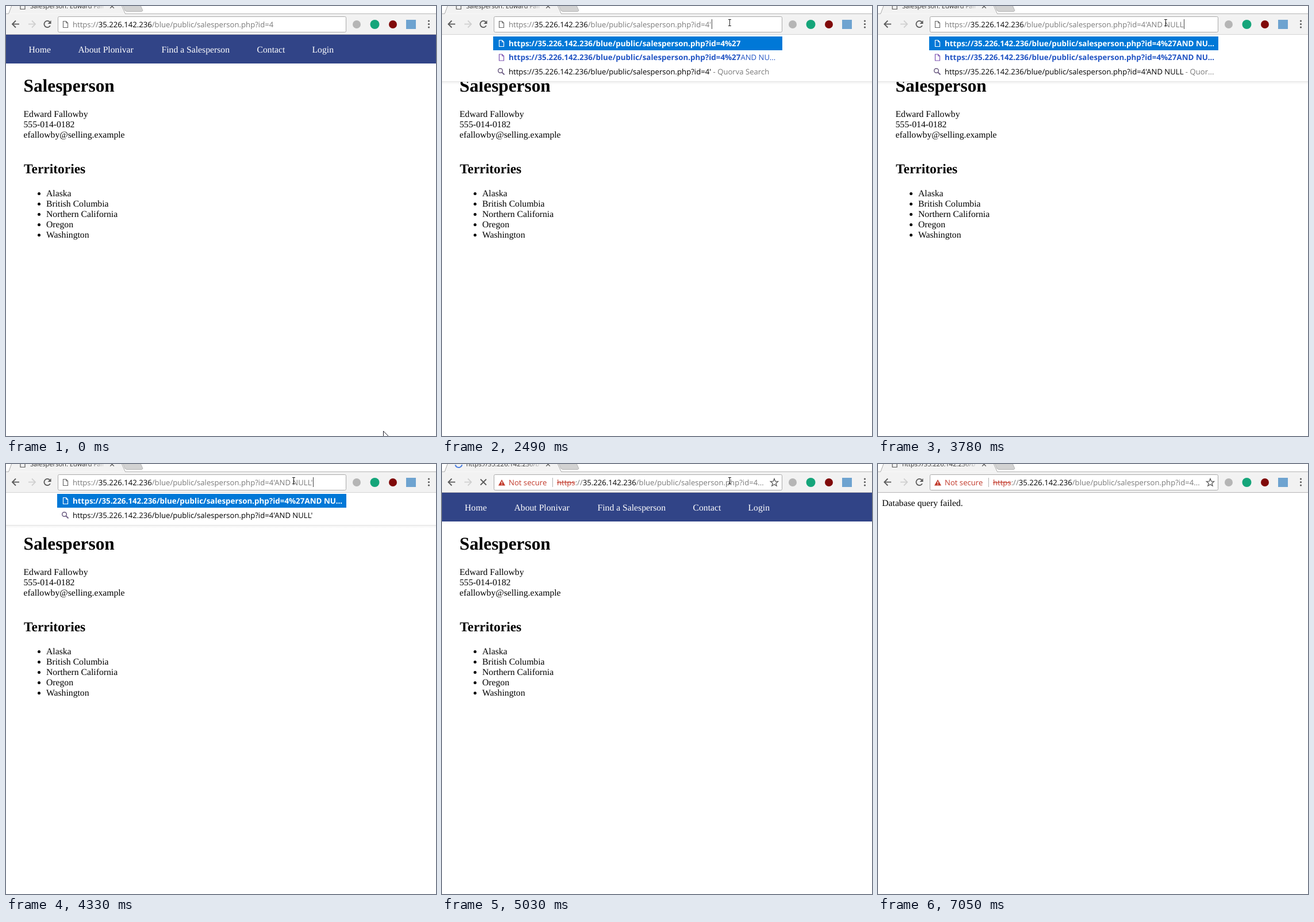
Write an HTML page with a canvas that moves like this. It is 748 px wide and 748 px high and loops after 7.37 s.

```html
<!DOCTYPE html>
<html lang="en">
<head>
<meta charset="utf-8">
<title>Salesperson</title>
<style>
html, body { margin: 0; width: 100%; height: 100%; overflow: hidden; background: #fff; }
canvas { display: block; }
</style>
</head>
<body>
<canvas id="stage" width="748" height="748"></canvas>
<script>
const c = document.getElementById('stage').getContext('2d');
const LOOP = 7370;
const SANS = '"Open Sans", "Noto Sans", sans-serif';
const SERIF = '"Liberation Serif", "Times New Roman", serif';
const UI = `13.13px ${SANS}`, UI_BOLD = `bold 13.4px ${SANS}`, BODY = `15.7px ${SERIF}`;
const BLUE = '#0078d7', LINK = '#2255c4', GRAY = '#7a7a7a', RED = '#c23a2b', ICON = '#5a5a5a';
const HOST = '35.226.142.236', PATH = '/blue/public/salesperson.php?id=4';
const URL_TEXT = 'https://' + HOST + PATH;
const ROW_WIDTH = 469.5;

// typed suffix of the address by time
const typing = [[0, ''], [2490, "'"], [2860, "'A"], [2940, "'AN"], [3090, "'AND"], [3170, "'AND "],
  [3250, "'AND N"], [3480, "'AND NU"], [3630, "'AND NUL"], [3780, "'AND NULL"], [4180, "'AND NULL'"]];

// pointer: time, x, y, shape
const pointer = [[0, 656, 739, 'arrow'], [70, 662, 470, 'arrow'], [140, 611, 61, 'arrow'], [210, 0, 0, ''],
  [440, 508, 26, 'beam'], [520, 504, 27, 'beam'], [680, 501, 28, 'beam'], [830, 500.5, 29, 'beam'],
  [5350, 420, 70, 'arrow'], [5430, 262, 132, 'arrow'], [5510, 138, 157, 'arrow'], [5590, 72, 116, 'arrow'],
  [5660, 58, 81, 'arrow'], [5890, 52, 75, 'arrow'], [5970, 46, 68, 'arrow'], [6045, 56, 61, 'arrow'],
  [6120, 71, 60, 'arrow'], [6195, 84, 65, 'arrow'], [6270, 87, 74, 'arrow'], [6350, 79, 82, 'arrow'],
  [6430, 68, 84, 'arrow'], [6505, 64, 87, 'arrow'], [6580, 67, 90, 'arrow'], [6670, 98, 122, 'arrow'],
  [6750, 228, 262, 'arrow'], [6825, 410, 450, 'arrow'], [6900, 590, 625, 'arrow'], [6975, 717, 737, 'arrow'],
  [7050, 0, 0, '']];

const at = (list, t) => list.findLast(k => k[0] <= t);

function rect(x, y, w, h, color) {
  c.fillStyle = color;
  c.fillRect(x, y, w, h);
}

function text(s, x, y, font, color) {
  c.font = font;
  c.fillStyle = color;
  c.fillText(s, x, y);
  return x + c.measureText(s).width;
}

function width(s, font) {
  c.font = font;
  return c.measureText(s).width;
}

function path(points, color, w = 1, fill, close) {
  c.beginPath();
  points.forEach(([x, y]) => c.lineTo(x, y));
  if (close) c.closePath();
  if (fill) { c.fillStyle = fill; c.fill(); }
  if (color) { c.strokeStyle = color; c.lineWidth = w; c.stroke(); }
}

function disc(x, y, r, color) {
  c.beginPath();
  c.arc(x, y, r, 0, 7);
  c.fillStyle = color;
  c.fill();
}

function arc(x, y, r, from, to, color, w) {
  c.beginPath();
  c.arc(x, y, r, from, to);
  c.strokeStyle = color;
  c.lineWidth = w;
  c.stroke();
}

function page(x, y, color) {
  path([[x, y], [x + 5, y], [x + 8, y + 3], [x + 8, y + 11], [x, y + 11]], color, 1.2, null, true);
  path([[x + 5, y], [x + 5, y + 3], [x + 8, y + 3]], color);
}

function lens(x, y) {
  arc(x, y, 3.8, 0, 7, '#6a5a80', 1.5);
  path([[x + 2.8, y + 2.8], [x + 7, y + 7]], '#6a5a80', 1.8);
}

function arrowIcon(x, dir, color) {
  path([[x - 6 * dir, 31.5], [x + 6 * dir, 31.5]], color, 1.8);
  path([[x, 25.5], [x - 6 * dir, 31.5], [x, 37.5]], color, 1.8);
}

function cross(x, y, r, w) {
  path([[x - r, y - r], [x + r, y + r]], ICON, w);
  path([[x + r, y - r], [x - r, y + r]], ICON, w);
}

function star(x, y) {
  const pts = Array.from({ length: 10 }, (_, i) => {
    const a = i * Math.PI / 5 - Math.PI / 2, r = i % 2 ? 3 : 7;
    return [x + r * Math.cos(a), y + r * Math.sin(a)];
  });
  path(pts, ICON, 1.3, null, true);
}

function drawTab(t) {
  path([[4.5, 13.5], [10, -1], [201, -1], [207.5, 13.5]], '#a8a8a8', 1, '#f2f2f2');
  path([[203, -1], [207, 8], [210, 9.5], [236, 9.5], [238, 8], [234, -1]], '#b4b4b4', 1, '#d2d2d2');
  rect(0, 13, 5, 1, '#b4b4b4');
  rect(207, 13, 541, 1, '#b4b4b4');
  const fade = c.createLinearGradient(145, 0, 175, 0);
  fade.addColorStop(0, '#333');
  fade.addColorStop(1, 'rgba(51,51,51,0)');
  text(t < 4560 ? 'Salesperson: Edward Fall' : URL_TEXT.slice(0, 24), 42, 4, `11.1px ${SANS}`, fade);
  cross(184.5, 0.5, 3.3, 1.3);
  if (t >= 4560 && t < 5110) {
    const a = 0.2 + Math.floor((t - 5030) / 80) * 0.6;
    arc(29, 0, 6, a, a + 2.7, t < 4790 ? '#999' : '#4a7de0', 2);
  } else page(25, -5.5, ICON);
}

function drawToolbar(t) {
  rect(0, 14, 748, 36, '#f2f2f2');
  rect(0, 49, 748, 1, '#b6b4b6');
  arrowIcon(17, 1, ICON);
  arrowIcon(45, -1, '#d0d0d0');
  if (t >= 4560 && t < 5110) cross(72, 31.5, 5, 1.8);
  else {
    arc(72, 31.5, 5.6, 0.5, 5.5, ICON, 1.8);
    path([[78.5, 25], [78.5, 31], [72.5, 31]], null, 1, ICON, true);
  }
  c.beginPath();
  c.roundRect(90.5, 18.5, 501, 27, 2);
  c.fillStyle = '#fff';
  c.fill();
  c.strokeStyle = '#a9a9a9';
  c.lineWidth = 1;
  c.stroke();
  disc(610, 32, 7, '#b5b5b5');
  disc(641.5, 32, 8, '#15a57a');
  disc(673, 32, 7, '#800a0a');
  rect(696, 24, 17, 16, '#6ea3d0');
  for (const y of [26, 31.5, 37]) disc(735.5, y, 1.6, ICON);
}

function drawUrl(x, suffix, color) {
  x = text('https://', x, 37, UI, color || GRAY);
  x = text(HOST, x, 37, UI, color || '#000');
  return text(PATH + suffix, x, 37, UI, color || GRAY);
}

function select(from, to) {
  c.save();
  c.beginPath();
  c.rect(from, 21, to - from, 19);
  c.clip();
  rect(from, 21, to - from, 19, BLUE);
  drawUrl(116, '', '#fff');
  c.restore();
}

function drawAddress(t, suffix) {
  if (t >= 4790) {
    path([[104, 27], [110, 37.5], [98, 37.5]], null, 1, RED, true);
    rect(103.4, 30.5, 1.3, 3.5, '#fff');
    rect(103.4, 35, 1.3, 1.3, '#fff');
    text('Not secure', 116, 37, UI, RED);
    rect(192, 24, 1, 16, '#b0b0b0');
    drawUrl(200, '...');
    const w = width('https', UI);
    rect(200, 22, w, 22, '#fff');
    text('https', 200, 37, UI, RED);
    rect(200, 32, w, 1, RED);
  } else {
    page(99.5, 26.5, '#6a6a6a');
    const end = drawUrl(116, suffix);
    if (t >= 600 && t < 1010) select(116, end);
    if (t >= 1010 && t < 1940) select(end - width('4', UI) - 0.5, end);
    if (t >= 1940 && t < 4560) rect(Math.round(end + 1), 23, 1, 17, '#444');
  }
  if (t >= 4560) star(578, 32.5);
}

// a run of [text, font, color] parts, shortened with dots at the right edge
function row(y, parts) {
  const total = () => parts.reduce((sum, p) => sum + width(p[0], p[1]), 0);
  const last = parts[parts.length - 1], full = last[0];
  for (let n = full.length - 1; n >= 0 && total() > ROW_WIDTH; n--) last[0] = full.slice(0, n).trimEnd() + '...';
  parts.reduce((x, p) => text(p[0], x, y, p[1], p[2]), 116);
}

function drawSuggestions(suffix) {
  const done = suffix.endsWith("NULL'");
  const top = done ? 52 : 53, bottom = done ? 106 : 131;
  const typed = suffix.replaceAll("'", '%27'), rest = 'AND NULL%27'.slice(typed.length - 3);
  const shade = c.createLinearGradient(0, bottom, 0, bottom + 6);
  shade.addColorStop(0, 'rgba(0,0,0,.06)');
  shade.addColorStop(1, 'rgba(0,0,0,0)');
  rect(0, bottom, 748, 6, shade);
  rect(0, 49, 748, 1, '#d4d4d4');
  rect(0, 50, 748, bottom - 50, '#fff');
  rect(0, bottom, 748, 1, '#e2e2e2');
  rect(89, top, 503, 24, BLUE);
  page(99.5, top + 6.5, '#fff');
  row(top + 17, [[URL_TEXT + typed, UI_BOLD, '#fff']]);
  if (!done) {
    page(99.5, 84, '#7a50b0');
    const fits = width(URL_TEXT + typed, UI_BOLD) < 450;
    row(94, fits
      ? [[URL_TEXT + typed, UI_BOLD, LINK], [rest, UI, LINK]]
      : [[URL_TEXT + typed + rest, UI_BOLD, LINK]]);
  }
  const y = done ? 94 : 119, search = [[URL_TEXT + suffix, UI, '#000']];
  lens(101.5, y - 6.5);
  if (!done) search.push([' - Quorva Search', UI, GRAY]);
  row(y, search);
}

function drawPage(t) {
  if (t >= 5110) {
    text('Database query failed.', 7, 73, BODY, '#000');
    return;
  }
  rect(0, 50, 748, 50, '#314487');
  [['Home', 39.5], ['About Plonivar', 125.5], ['Find a Salesperson', 270.5], ['Contact', 436.5], ['Login', 532.5]]
    .forEach(([s, x]) => text(s, x, 81, BODY, '#fff'));
  text('Salesperson', 30.5, 149, `bold 31.3px ${SERIF}`, '#000');
  ['Edward Fallowby', '555-014-0182', 'efallowby@selling.example']
    .forEach((s, i) => text(s, 30.5, 193 + i * 18, BODY, '#000'));
  text('Territories', 31, 291, `bold 23.45px ${SERIF}`, '#000');
  ['Alaska', 'British Columbia', 'Northern California', 'Oregon', 'Washington'].forEach((s, i) => {
    disc(57.5, 326.5 + i * 18, 2.5, '#000');
    text(s, 70, 331 + i * 18, BODY, '#000');
  });
}

function drawPointer(t) {
  const [, x, y, shape] = at(pointer, t);
  if (shape === 'arrow') {
    const outline = [[0, 0], [0, 13], [3, 10.2], [5.3, 15.2], [7.4, 14.2], [5.2, 9.4], [9.3, 9.4]];
    path(outline.map(([dx, dy]) => [x + 0.5 + dx, y + 0.5 + dy]), '#22222e', 1, '#fff', true);
  } else if (shape === 'beam') {
    path([[x, y - 5.5], [x, y + 5.5]], '#222', 1);
    for (const dy of [-5.5, 5.5]) path([[x - 2.5, y + dy], [x + 2.5, y + dy]], '#222', 1);
  }
}

function draw(now) {
  const t = now % LOOP, suffix = at(typing, t)[1];
  rect(0, 0, 748, 748, '#fff');
  drawPage(t);
  drawTab(t);
  drawToolbar(t);
  drawAddress(t, suffix);
  if (t >= 2490 && t < 4560) drawSuggestions(suffix);
  drawPointer(t);
}

c.textRendering = 'geometricPrecision';
const start = performance.now();
function tick() {
  draw(performance.now() - start);
  requestAnimationFrame(tick);
}
tick();
</script>
</body>
</html>
```
